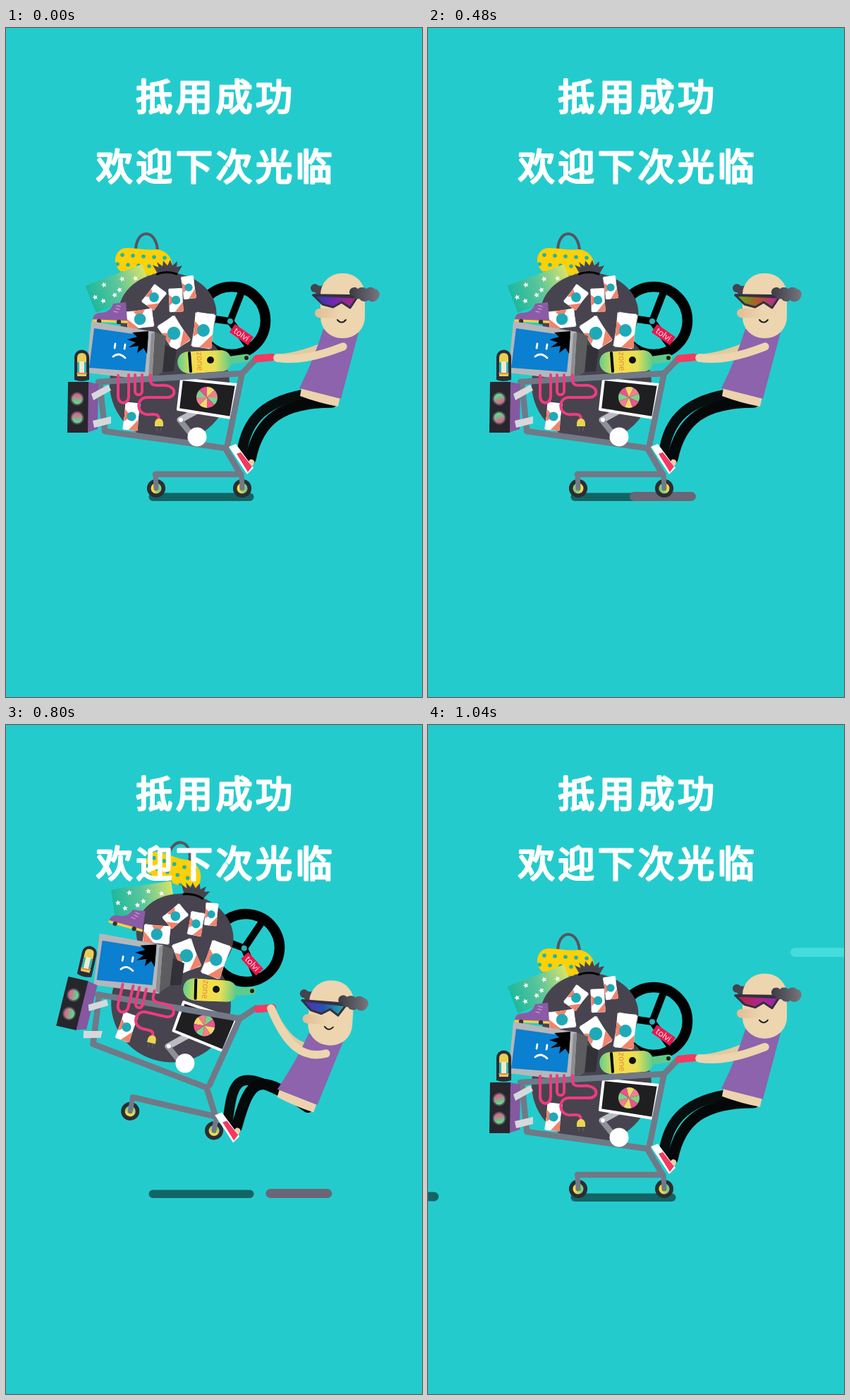
An HTML page that plays this animation: 590 by 949 pixels, repeating every 1080 ms.

```html
<!DOCTYPE html>
<html lang="zh">
<head>
<meta charset="utf-8">
<style>
html, body { margin: 0; width: 100%; height: 100%; overflow: hidden; background: #24cbcd; }
svg { display: block; width: 590px; height: 949px; }
.title { font: 400 52px "Noto Sans CJK SC", "Noto Sans CJK", sans-serif; letter-spacing: 4.6px; text-anchor: middle;
  fill: #fff; stroke: #fff; stroke-width: 3; stroke-linejoin: round; }
.label { font: 12px "Open Sans", sans-serif; text-anchor: middle; }
.spin { transform-box: fill-box; transform-origin: center; }
.line { fill: none; stroke-linecap: round; stroke-linejoin: round; }
</style>
</head>
<body>
<svg viewBox="0 0 590 949">
  <defs>
    <linearGradient id="lime"><stop stop-color="#5fd08c"/><stop offset=".3" stop-color="#f0df50"/><stop offset=".7" stop-color="#e6df54"/><stop offset="1" stop-color="#56c98d"/></linearGradient>
    <linearGradient id="paper"><stop stop-color="#1fb89c"/><stop offset=".5" stop-color="#5bc69a"/><stop offset="1" stop-color="#d8e36a"/></linearGradient>
    <linearGradient id="disc" x2="0" y2="1"><stop offset=".15" stop-color="#d8648c"/><stop offset=".85" stop-color="#5fd98c"/></linearGradient>
    <linearGradient id="tyre"><stop offset=".3" stop-color="#f0dc4a"/><stop offset=".7" stop-color="#7ecb7c"/></linearGradient>
    <linearGradient id="hair"><stop stop-color="#3c3a44"/><stop offset="1" stop-color="#77767f"/></linearGradient>
    <linearGradient id="nose"><stop stop-color="#e2bd94"/><stop offset="1" stop-color="#ecd5af"/></linearGradient>
    <linearGradient id="lens"><stop/><stop offset=".5"/><stop offset="1"/></linearGradient>
    <path id="star" fill="#fff" d="M0-4L1.2-1.3 4-1.2 1.8.6 2.5 3.5 0 1.8-2.5 3.5-1.8.6-4-1.2-1.2-1.3z"/>
    <path id="bag" d="M172 312C186 312 199 316 213 314 230 315 238 330 236 343 235 354 222 354 211 353 197 349 187 350 175 349 161 349 154 338 155 327 157 316 164 312 172 312z"/>
    <clipPath id="bagClip"><use href="#bag"/></clipPath>
  </defs>

  <g id="scene">
    <rect id="haze" y="311" width="94" height="13" rx="6.5" fill="#44dcdc"/>
    <rect x="202.500" y="659.500" width="149" height="11.500" rx="5.700" fill="#126465"/>
    <rect id="ground" y="658" width="94" height="13" rx="6.500" fill="#6a6676"/>
    <rect id="dark" y="657.500" width="94" height="13" rx="6.500" fill="#126465"/>

    <!-- data-at: own pivot, data-turn: degrees when tipped, data-slack: play against the cart -->
    <g id="cart">
      <g data-at="197 333" data-slack="0 -14">
        <path class="line" stroke="#55565f" stroke-width="4" d="M184 318C183 282 216 284 215 320"/>
        <use href="#bag" fill="#fdd007"/>
        <g id="dots" fill="#1eb5a8" clip-path="url(#bagClip)"/>
      </g>
      <g data-at="160 369">
        <g id="stars" transform="translate(160 369)rotate(-21)"><path fill="url(#paper)" d="M-43-20H43V21H-43z"/></g>
      </g>
      <g data-at="320 415" data-slack="0 -12">
        <circle cx="320" cy="415" r="48" fill="none" stroke="#000" stroke-width="14.500"/>
        <path class="line" stroke="#000" stroke-width="10" d="M318 416L335 372M318 416L275 410M318 416L346 454"/>
        <circle cx="318" cy="416" r="4" fill="#2dafba"/>
        <g transform="translate(334 435)rotate(35)">
          <rect x="-16" y="-7" width="32" height="14" fill="#e9174d"/>
          <text class="label" y="4" fill="#fff">tolvi</text>
        </g>
      </g>
      <g data-at="232 505" fill="#47444f">
        <path d="M216 350L208 336 217 340 214 332 222 338 223 330 229 337 233 329 236 337 243 331 242 339 250 337 243 349z"/>
        <ellipse cx="229" cy="405" rx="69.500" ry="58"/>
        <ellipse cx="232" cy="505" rx="85" ry="82.500"/>
        <path class="line" stroke="#000" stroke-width="3" d="M214 349Q229 344 242 349"/>
      </g>
      <g id="cards"></g>

      <g data-at="147 408" data-slack="-2 -5">
        <path fill="#8b5ba6" d="M152 391L170 389 172 416 123 414Q123 405 133 404 148 404 152 391z"/>
        <path class="line" stroke="#f4d03f" stroke-width="3.500" d="M124 415L171 417"/>
        <path class="line" stroke="#c48fd0" stroke-width="1.500" d="M157 394l5 1M156 398l5 1M153 402l5 1"/>
        <circle cx="132" cy="416" r="3.200" fill="#333"/><circle cx="160" cy="417" r="3.200" fill="#333"/>
      </g>

      <g data-at="162 455" data-turn="1" data-slack="-4 4">
        <path fill="#323138" d="M220 447L242 456 238 487 218 488z"/>
        <path fill="#5d5d60" d="M208 430L227 437 222 488 206 499z"/>
        <path fill="#b5b7ba" d="M121 416L211 431 207 500 114 489z"/>
        <path fill="#8c8e91" d="M211 431L207 500 202 495 206 434z"/>
        <path fill="#0b7fd0" d="M125 426L202 437 197 488 118 482z"/>
        <path d="M202 430L179 432 186 438 172 442 184 446 174 453 188 451 186 461 195 454 200 462z"/>
        <path class="line" stroke="#fff" stroke-width="2.800" d="M155 448l-1 6M169 449l-1 6M152 466Q160 459 169 468"/>
      </g>

      <g data-at="282 473" data-turn="6">
        <path class="line" stroke="#5fcb8a" stroke-width="11" d="M312 472L341 468"/>
        <path fill="url(#lime)" d="M258 459L306 457C324 459 324 485 308 487L260 490C238 489 238 460 258 459z"/>
        <path fill="#f2dd4c" d="M263 459L290 458V488L264 490z"/>
        <path class="line" stroke="#000" stroke-width="4" d="M260 461L262 487"/>
        <circle cx="290" cy="471" r="5" fill="#111"/><circle cx="341" cy="468" r="3" fill="#222"/>
        <text class="label" transform="translate(271 473)rotate(88)" fill="#e8823c">zone</text>
      </g>

      <g data-at="260 560" data-turn="0" data-slack="-6 4">
        <path class="line" stroke="#b9bcc3" stroke-width="9" d="M247 556L276 540"/>
        <path class="line" stroke="#8d9099" stroke-width="8" d="M248 558L264 578"/>
        <circle cx="248" cy="556" r="3" fill="#fff"/>
      </g>
      <g data-at="286 525">
        <path fill="#1f1f22" stroke="#fff" stroke-width="4" stroke-linejoin="round" d="M249 498L327 506 319 553 244 541z"/>
        <g id="pie" class="spin"></g>
      </g>
      <g id="rails" class="line" stroke="#717987" stroke-width="8.500"></g>
      <g data-at="260 560" data-turn="0" data-slack="-6 4"><circle cx="271" cy="580" r="13.500" fill="#fff"/></g>

      <g data-at="198 525">
        <path class="line" stroke="#ee3b80" stroke-width="4" d="M159 493V522C159 535 174 535 174 522V492M183 492V515C183 522 193 522 193 515V492M205 492V500C205 510 218 506 227 507 242 509 242 524 228 524H200C185 524 184 546 199 548 210 549 217 545 217 556"/>
        <path fill="#e9d54f" d="M211 562Q211 554 217 554 223 554 223 562V565H211z"/>
        <path class="line" stroke="#555" stroke-width="2" d="M214 566v5M220 566v5"/>
      </g>

      <g data-at="102 538" data-slack="-6 -4">
        <path fill="#85589f" d="M116 502L131 505 130 569 114 574z"/>
        <path fill="#26262c" d="M88 502H117L116 574H87z"/>
        <g stroke="#55545e" stroke-width="2" fill="url(#disc)">
          <circle class="spin" cx="101" cy="526" r="8.500"/><circle class="spin" cx="101" cy="553" r="8.500"/>
        </g>
      </g>
      <g data-at="107 480" data-slack="-3 -7">
        <path fill="#2c2b35" d="M97 499V467A10.500 10.500 0 0 1 118 467V499Q107 503 97 499z"/>
        <path fill="#e7cf54" d="M101 494V468Q101 461 107.500 461 114 461 114 468V494z"/>
        <path fill="#26bcae" d="M101 474H114V489H101z"/><path fill="#f4e9d2" d="M104 473H111V490H104z"/>
        <path class="line" stroke="#ee7e5c" stroke-width="2" d="M101 490H114"/>
      </g>
      <g fill="#d6d8dc">
        <path data-at="135 516" data-slack="-6 12" d="M121 519L145 506 149 514 124 528z"/>
        <path data-at="136 560" data-slack="-6 12" d="M123 557L149 551 149 561 125 567z"/>
      </g>
      <path data-at="366 468" data-turn="0" data-slack="-6 12" class="line" stroke="#f5395f" stroke-width="10.500" d="M356 469L377 467"/>
      <g id="wheels"></g>
    </g>

    <g id="man" class="line">
      <path id="armFar" stroke="#e3ca9f" stroke-width="11"/>
      <path id="legFar" stroke="#080d0e" stroke-width="14.500"/>
      <path id="legNear" stroke="#050809" stroke-width="15.500"/>
      <g id="shoe">
        <path stroke="#ecd0a8" stroke-width="8" d="M348 616L345 621"/>
        <path fill="#fff" d="M316 594L326 590 351 624 342 633z"/>
        <path fill="#f5395f" d="M327 604L333 602 349 622 343 630z"/>
      </g>
      <g id="torso">
        <path fill="#ecd3ae" d="M419 511L474 523 471 537Q444 532 417 522z"/>
        <path fill="#8c63ac" d="M450 427Q478 425 500 432L475 526 416 511Q437 469 450 427z"/>
      </g>
      <path id="armNear" stroke="#ecd5af" stroke-width="11.500"/>
      <g id="head">
        <g fill="#45434e"><circle cx="438" cy="369" r="6"/><circle cx="444" cy="372" r="6.500"/><circle cx="452" cy="371" r="7"/></g>
        <rect x="446" y="348" width="63" height="92" rx="30" fill="#ecd5af"/>
        <rect x="438" y="398" width="36" height="13" rx="6.500" fill="url(#nose)"/>
        <path stroke="#222" stroke-width="2" d="M470 414Q476 421 482 414"/>
        <path fill="url(#lens)" stroke="#33313f" stroke-width="3" d="M436 379L498 382 488 397 476 389 464 396 449 392z"/>
        <path stroke="#33313f" stroke-width="3.500" d="M436 379L506 380"/>
        <path fill="url(#hair)" d="M487 375a7 7 0 0 1 12-5a9 9 0 0 1 12 0a9 9 0 0 1 12 0a8 8 0 0 1 5 13a9 9 0 0 1-14 3a9 9 0 0 1-13-2a8 8 0 0 1-9-4q-5-1-5-5z"/>
      </g>
    </g>
  </g>
  <text class="title" x="297.500" y="117">抵用成功</text>
  <text class="title" x="297.500" y="216">欢迎下次光临</text>
</svg>

<script>
const LOOP = 1080, STEP = 40, TILT = 13, SACK = [232, 505];
const $ = id => document.getElementById(id);
const repeat = (n, f) => Array.from({ length: n }, (_, i) => f(i)).join('');
const clamp = x => Math.min(1, Math.max(0, x));
const ramp = (t, a, b) => (1 - Math.cos(Math.PI * clamp((t - a) / (b - a)))) / 2;
const lerp = (p, q, k) => p.map((v, i) => v + (q[i] - v) * k);

function turned([x, y], [cx, cy], deg) {
  const a = deg * Math.PI / 180, c = Math.cos(a), s = Math.sin(a);
  return [cx + (x - cx) * c - (y - cy) * s, cy + (x - cx) * s + (y - cy) * c];
}

// Repeated details
$('dots').innerHTML = repeat(15, i => {
  const row = Math.floor(i / 5);
  return `<circle cx="${165 + i % 5 * 15 - row % 2 * 7}" cy="${322 + row * 13 + i % 5}" r="2.800"/>`;
});
$('stars').innerHTML += repeat(8, i => `<use href="#star" x="${-36 + 9 * i}" y="${12 * Math.sin(i * 2.3)}"/>`);

const rim = i => `${285 + 15 * Math.sin(i * Math.PI / 4)} ${524 - 15 * Math.cos(i * Math.PI / 4)}`;
const shades = ['#f2d96b', '#f07f8e', '#7fd08a', '#e8558f'];
$('pie').innerHTML = repeat(8, i => `<path fill="${shades[i % 4]}" d="M285 524L${rim(i)}A15 15 0 0 1 ${rim(i + 1)}z"/>`);

// x, y, angle, width, height
const cards = [[210, 382, 35, 21, 31], [241, 386, -5, 19, 33], [259, 368, -10, 17, 32], [190, 413, 80, 25, 37],
  [238, 433, -36, 28, 42], [280, 429, 5, 27, 49], [178, 551, 4, 20, 39]];
$('cards').innerHTML = cards.map(([x, y, a, w, h]) => {
  const l = -w / 2, u = -h / 2, sheet = `x="${l}" y="${u}" width="${w}" height="${h}"`;
  return `<g data-at="${x} ${y}"><g transform="translate(${x} ${y})rotate(${a})">
    <rect ${sheet} fill="#e9e9ee" transform="rotate(5)"/><rect ${sheet} fill="#fff"/>
    <path fill="#f0836b" d="M${l} ${u * .5}L0 0 ${l} ${h * .2}zM${-l} ${h * .1}V${h * .5}H${l * .3}z"/>
    <circle r="${w * .33}" fill="#1fa9b8"/></g></g>`;
}).join('');

// Each pole swings on its first end
const rails = ['133 502 L140 570', '131 502 L335 490', '140 572 L311 596', '314 592 L335 489',
  '311 596 L332 632', '212 633 L332 633', '336 489 L354 470'];
$('rails').innerHTML = rails.map(d => `<path data-at="${d.split(' L')[0]}" data-slack="-6 12" d="M${d}"/>`).join('');
$('wheels').innerHTML = [213, 335].map(x => `<g data-at="${x} 653" data-slack="-6 12"><g transform="translate(${x} 653)">
  <circle r="10.300" fill="url(#tyre)" stroke="#2d2c33" stroke-width="5.500" class="spin"/>
  <path class="line" stroke="#717987" stroke-width="7" d="M-1-20L0 0"/></g></g>`).join('');

const numbers = (s, none) => (s || none).split(' ').map(Number);
const parts = [...document.querySelectorAll('[data-at]')].map(el => ({
  el, at: numbers(el.dataset.at), turn: +(el.dataset.turn ?? TILT), slack: numbers(el.dataset.slack, '0 0')
}));
const spinners = document.querySelectorAll('.spin');
const lensStops = document.querySelectorAll('#lens stop');
const place = (el, [x, y], r = 0, [cx, cy] = [0, 0]) =>
  el.setAttribute('transform', `translate(${x} ${y})rotate(${r} ${cx} ${cy})`);

// Where the tipping cart carries a point
const carried = (at, slack, k) => turned(at, SACK, TILT * k).map((v, i) => v - at[i] + (slack[i] + (i ? 0 : 2)) * k);
const hop = t => -111 * Math.sin(Math.PI * clamp((t - 617) / 400)) ** 2;

function limb(id, from, to, joint, bend) {
  $(id).setAttribute('d', `M${from}C${lerp(from, joint, bend)} ${lerp(to, joint, bend)} ${to}`);
}
function arm(id, from, to, sag) {
  const [x, y] = lerp(from, to, .6);
  limb(id, from, to, [x, y + sag], .7);
}
// The knee rises as hip and foot come closer
function leg(id, hip, foot, size, bend) {
  const [dx, dy] = [foot[0] - hip[0], foot[1] - hip[1]], d = Math.hypot(dx, dy);
  const rise = Math.sqrt(Math.max(0, size * size - d * d / 4)) / d;
  const [x, y] = lerp(hip, foot, .58);
  limb(id, hip, foot, [x - dy * rise, y + dx * rise], bend);
}

function drawCart(t) {
  const move = ramp(t, 600, 700) - ramp(t, 880, 1020);
  const turn = (t >= 600) - ramp(t, 880, 1020);
  place($('cart'), [0, hop(t)]);
  for (const { el, at, turn: deg, slack } of parts) place(el, carried(at, slack, move), deg * turn, at);
  return carried([366, 468], [-6, 12], move);
}

function drawMan(t, grip) {
  const air = ramp(t, 600, 720) - ramp(t, 880, 1020);
  const pull = Math.sin(Math.PI * clamp((t - 720) / 320));
  const drag = hop(t - 40), lean = 3 * air + 6 * pull;
  const waist = [458, 475], shift = [-38 * pull, 27.5 * air + .18 * drag], step = [-28 * pull, .45 * drag];
  const onBody = p => turned(p, waist, lean).map((v, i) => v + shift[i]);
  const onShoe = ([x, y]) => [x + step[0], y + step[1]];

  place($('torso'), shift, lean, waist);
  const neck = [478, 394], head = onBody(neck);
  place($('head'), [head[0] - neck[0], head[1] - neck[1]], lean / 2, neck);
  place($('shoe'), step);

  const hand = [385 + grip[0] - 10 * air, 468 + grip[1] + hop(t)];
  arm('armFar', onBody([466, 445]), hand, 8 + 30 * air);
  arm('armNear', onBody([478, 452]), hand, 12 + 38 * air);
  leg('legFar', onBody([434, 518]), onShoe([334, 606]), 84, .7 + .2 * air);
  leg('legNear', onBody([462, 531]), onShoe([347, 611]), 90, .7 + .2 * air);
}

// Hue at the left and right end of the glasses
const hues = [[0, 230, 320], [200, 305, 180], [360, 150, -40], [600, 50, -70], [720, 230, 170], [880, 300, 180], [1040, 350, 290], [1080, 350, 290]];
function drawLens(t) {
  const i = hues.findIndex(h => h[0] > t), a = hues[i - 1], b = hues[i];
  const [, left, right] = lerp(a, b, (t - a[0]) / (b[0] - a[0]));
  lensStops.forEach((s, j) => s.setAttribute('stop-color', `hsl(${left + (right - left) * j / 2} 65% 42%)`));
}

// A streak crosses the stage from left to right
const cross = (el, k) => el.setAttribute('x', -94 + 684 * clamp(k));

function draw(t) {
  place($('scene'), [0, t >= 1000 ? 5 : 0]);
  drawMan(t, drawCart(t));
  drawLens(t);
  spinners.forEach(el => el.style.rotate = t / LOOP * 360 + 'deg');
  cross($('haze'), (t < 600 ? t : t - 880) / 180);
  cross($('ground'), t < 600 ? (t - 380) / 180 : 1 - (1 - clamp((t - 600) / 350)) ** 1.33);
  cross($('dark'), (t - 1036) / 180);
}

const start = performance.now();
function tick() {
  const t = (performance.now() - start) % LOOP;
  draw(Math.floor(t / STEP) * STEP);
  requestAnimationFrame(tick);
}
tick();
</script>
</body>
</html>
```
